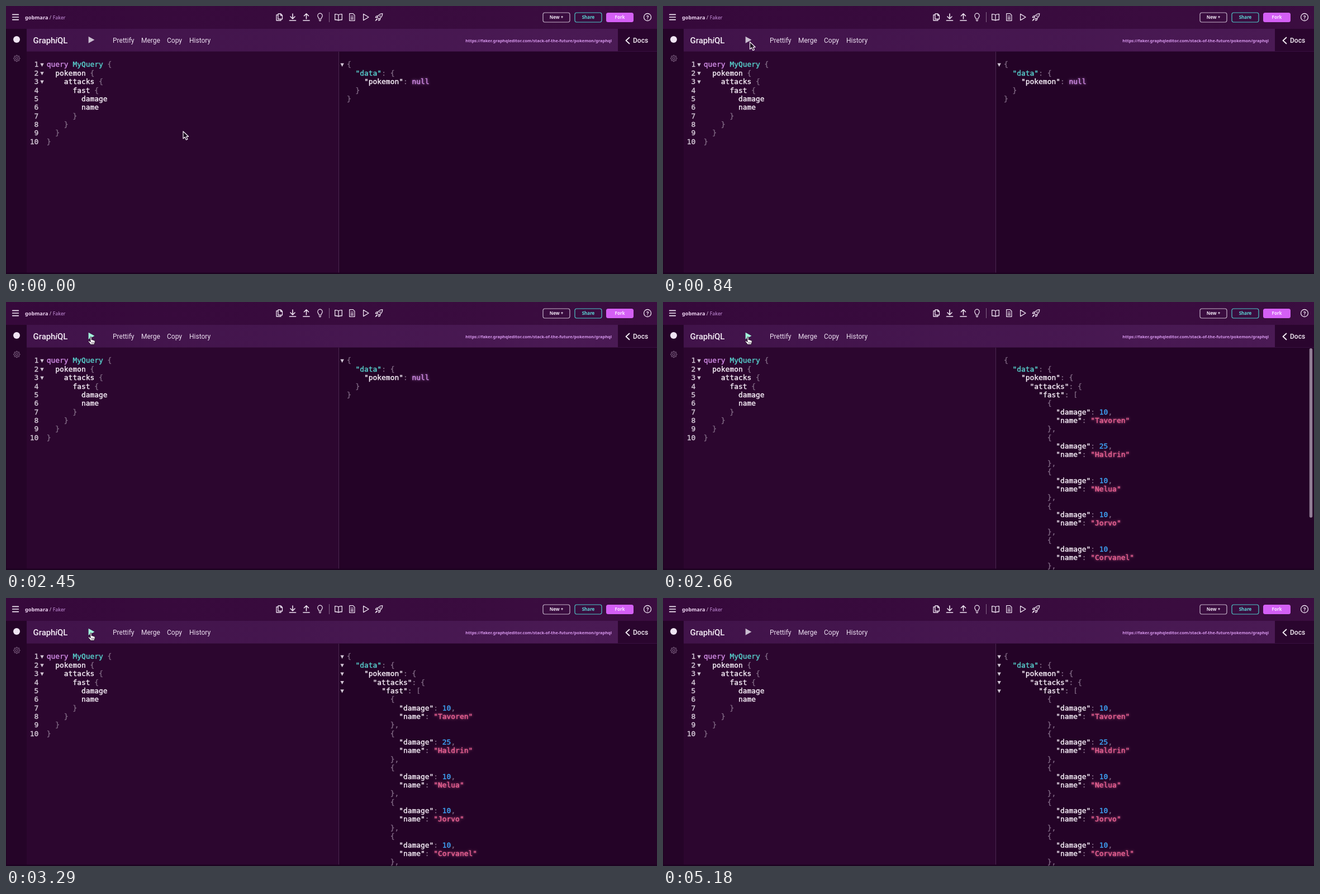
Recreate the animation shown at these times as an HTML page with a canvas. Size 1165 by 481 pixels, loop 5.25 s.

```html
<!DOCTYPE html>
<html lang="en">
<head>
<meta charset="utf-8">
<title>GraphiQL query</title>
<style>
html, body { margin: 0; width: 100%; height: 100%; overflow: hidden; background: #240327; }
canvas { display: block; width: 1165px; height: 481px; }
</style>
</head>
<body>
<canvas id="stage"></canvas>
<script>
const W = 1165, H = 481, LOOP = 5250, STEP = 70;
const ROW = 15.37, CELL = 7.766;
const MONO = '12.9px "DejaVu Sans Mono", monospace';
const UI = 'Roboto, sans-serif', SMALL = '"Noto Sans", sans-serif';
const COLOR = {
  white: '#f6eef7', teal: '#58d2ce', purple: '#cf8be4', punct: '#7d6580',
  number: '#3fa4f6', string: '#ea6394', gutter: '#d3c7d6', idle: '#cabed0', mint: '#a2f8dc'
};
const PLAY = [152, 63], REST = [317, 225];
const ARRIVE = 910, LOADED = 2520, FOLDED = 3120, LEAVE = 3430, GONE = 3780;

const canvas = document.getElementById('stage');
const ctx = canvas.getContext('2d');
const ratio = window.devicePixelRatio || 1;
canvas.width = W * ratio;
canvas.height = H * ratio;

const query = [
  'query MyQuery {', '  pokemon {', '    attacks {', '      fast {',
  '        damage', '        name', '      }', '    }', '  }', '}'
];
const attack = (name, damage = 10) => ({ damage, name });
const fast = [
  attack('Tavoren'), attack('Haldrin', 25), attack('Nelua'), attack('Jorvo'), attack('Corvanel')
];
const toLines = pokemon => JSON.stringify({ data: { pokemon } }, null, 2).split('\n');
const emptyLines = toLines(null);
// One more entry keeps the comma on the last visible bracket.
const fullLines = toLines({ attacks: { fast: [...fast, attack('Belwin')] } });

function rect(x, y, w, h, fill) {
  ctx.fillStyle = fill;
  ctx.fillRect(x, y, w, h);
}

function box(x, y, w, h, r, fill, stroke, lw = 1.2) {
  ctx.beginPath();
  ctx.roundRect(x, y, w, h, r);
  paint(fill, stroke, lw);
}

function paint(fill, stroke, lw = 1.3) {
  if (fill) { ctx.fillStyle = fill; ctx.fill(); }
  if (stroke) { ctx.strokeStyle = stroke; ctx.lineWidth = lw; ctx.stroke(); }
}

function path(d, x, y, fill, stroke, lw) {
  ctx.save();
  ctx.translate(x, y);
  const p = new Path2D(d);
  ctx.lineJoin = ctx.lineCap = 'round';
  if (fill) { ctx.fillStyle = fill; ctx.fill(p); }
  if (stroke) { ctx.strokeStyle = stroke; ctx.lineWidth = lw || 1.3; ctx.stroke(p); }
  ctx.restore();
}

function text(s, x, y, font, fill, align = 'left') {
  ctx.font = font;
  ctx.fillStyle = fill;
  ctx.textAlign = align;
  ctx.fillText(s, x, y);
}

// Code text is a little heavier than the regular weight.
function codeText(s, x, y, color, align, glow = 0) {
  ctx.shadowColor = color;
  ctx.shadowBlur = glow * ratio;
  text(s, x, y, MONO, color, align);
  ctx.shadowBlur = 0;
  ctx.strokeStyle = color;
  ctx.lineWidth = .4;
  ctx.strokeText(s, x, y);
}

function gradient(x0, x1, from, to) {
  const g = ctx.createLinearGradient(x0, 0, x1, 0);
  g.addColorStop(0, from);
  g.addColorStop(1, to);
  return g;
}

const rowY = i => 109.4 + i * ROW;
const foldMark = (x, row) => path('M-3.2 -2.6 H3.2 L0 3.6 Z', x, rowY(row) - 4, COLOR.gutter);

function queryColor(token) {
  if (token === 'query') return COLOR.purple;
  if (token === 'MyQuery') return COLOR.teal;
  return /\w/.test(token) ? COLOR.white : COLOR.punct;
}

function jsonColor(token, isKey) {
  if (token === '"data"') return COLOR.teal;
  if (isKey) return COLOR.white;
  if (token[0] === '"') return COLOR.string;
  if (token === 'null') return COLOR.purple;
  return /\d/.test(token) ? COLOR.number : COLOR.punct;
}

function code(lines, x, pick) {
  lines.forEach((line, row) => {
    if (rowY(row) > H + 12) return;
    for (const m of line.matchAll(/"[^"]*"|\w+|[^\s\w]/g)) {
      const color = pick(m[0], line[m.index + m[0].length] === ':');
      const glow = color === COLOR.string || m[0] === 'null' ? 4 : 0;
      codeText(m[0], x + m.index * CELL, rowY(row), color, 'left', glow);
    }
  });
}

function button(x, w, label, ink, fill, stroke) {
  box(x, 12, w, 17, 3.5, fill, stroke);
  text(label, x + w / 2, 23.2, '600 8px ' + SMALL, ink, 'center');
}

function topBar() {
  const ink = '#f0e5f3';
  const line = (d, x, lw) => path(d, x, 20, null, ink, lw);
  rect(0, 0, W, 41, gradient(0, W, '#36093b', '#3b0d40'));
  line('M-5.3 -4.6 H5.3 M-5.3 0 H5.3 M-5.3 4.6 H5.3', 17, 1.7);
  text('gobmara', 34, 23.6, '600 9.2px ' + SMALL, '#efd5f3');
  text('/', 77.7, 23.6, '9px ' + SMALL, '#d9c2de');
  text('Faker', 83.7, 23.6, '500 8.8px ' + SMALL, '#c993df');

  line('M-2 -6 H2.8 L5.5 -3.3 V3.5 H-2 Z M-2 -4 H-5 V6 H3 V3.5 M2.6 -6 V-3 H5.5', 489);
  line('M0 -6 V2.8 M-4 -1 L0 3 L4 -1 M-5.6 6 H5.6', 513, 1.6);
  line('M0 3 V-6 M-4 -2.2 L0 -6.2 L4 -2.2 M-5.6 6 H5.6', 537.5, 1.6);
  line('M-2 3 C-2 1 -4.2 0 -4.2 -2.6 A4.2 4.2 0 0 1 4.2 -2.6 C4.2 0 2 1 2 3 Z M-1.8 5 H1.8 M-1 6.7 H1', 562, 1.2);
  rect(578, 11, 1, 18, '#846788');
  line('M0 -4 C-2 -5.6 -4 -5.6 -6.3 -5.4 V4.8 C-4 4.6 -2 4.8 0 6 C2 4.8 4 4.6 6.3 4.8 V-5.4 C4 -5.6 2 -5.6 0 -4 V6', 595);
  line('M-4.6 -6.3 H1.8 L4.6 -3.5 V6.3 H-4.6 Z M-2.2 -2 H2.2 M-2.2 .8 H2.2 M-2.2 3.4 H2.2', 619.3, 1.2);
  line('M-4.4 -5.6 L5 0 L-4.4 5.6 Z', 644);
  line('M6.3 -6.3 C2 -6.3 -1 -4 -3.2 .4 L-.4 3.2 C4 1 6.3 -2 6.3 -6.3 Z M-1.5 -2.3 L-4.7 -2 L-6.3 .6 L-3.2 .4 M2.3 1.5 L2 4.7 L-.6 6.3 L-.4 3.2 M-4 3 L-6.3 6.3 L-3 4', 667.5, 1.2);
  ctx.beginPath();
  ctx.arc(669.3, 18.2, 1.1, 0, 7);
  paint(ink);

  button(961, 48, 'New +', '#efe4f2', null, '#c5b3ca');
  button(1018, 48, 'Share', '#5cd8d6', null, '#4fc7c7');
  button(1074, 49, 'Fork', '#fae4ff', '#d45ff5');
  ctx.beginPath();
  ctx.arc(1148, 20, 6.5, 0, 7);
  paint(null, ink, 1.3);
  text('?', 1148, 23.5, '700 9.5px ' + UI, ink, 'center');
}

function gear(x, y) {
  ctx.beginPath();
  for (let i = 0; i <= 64; i++) {
    const a = i / 64 * Math.PI * 2;
    const r = 4.9 + .75 * Math.tanh(3 * Math.cos(8 * a));
    ctx.lineTo(x + r * Math.cos(a), y + r * Math.sin(a));
  }
  paint(null, '#76597a', 1.1);
  ctx.beginPath();
  ctx.arc(x, y, 2, 0, 7);
  paint(null, '#76597a', 1.1);
}

function frame() {
  rect(0, 0, W, H, '#240327');
  rect(37, 81, 558, 400, '#2c062f');
  rect(0, 41, 37, 440, '#250428');
  topBar();
  rect(37, 41, 1058, 40, gradient(37, 1095, '#41134a', '#4a1a54'));
  rect(1095, 41, 70, 40, '#2a052e');
  rect(37, 81, W - 37, 1, '#391040');
  rect(595, 82, 1, 397, '#4a2750');
  rect(0, 41, 1, 440, '#1d0221');
  rect(0, 478.5, W, 2.5, '#1d0221');

  ctx.beginPath();
  ctx.arc(19, 60, 6, 0, 7);
  paint('#efe4f2');
  gear(19.3, 94);

  const title = '500 14.9px ' + UI;
  let x = 48.5;
  for (const [part, font] of [['Graph', title], ['i', 'italic ' + title], ['QL', title]]) {
    text(part, x, 66.5, font, '#f7eff8');
    x += ctx.measureText(part).width;
  }
  [['Prettify', 191], ['Merge', 242], ['Copy', 288], ['History', 328]].forEach(([label, left]) =>
    text(label, left, 66, '12px ' + UI, '#ecdff0'));
  text('https://faker.graphqleditor.com/stack-of-the-future/pokemon/graphql',
    1084, 65, '600 7.45px ' + SMALL, '#d898ee', 'right');
  path('M3 -5.5 L-3 0 L3 5.5', 1112.5, 62, null, '#f5eef6', 1.8);
  text('Docs', 1122, 66.2, '500 12px ' + UI, '#f5eef6');
}

function editor() {
  query.forEach((_, i) => codeText(i + 1, 58.3, rowY(i), COLOR.gutter, 'right'));
  [0, 1, 2].forEach(i => foldMark(64.5, i));
  code(query, 72.8, queryColor);
}

function response(t) {
  const loaded = t >= LOADED;
  code(loaded ? fullLines : emptyLines, 610, jsonColor);
  const folds = !loaded ? 1 : t >= FOLDED ? 5 : 0;
  for (let i = 0; i < folds; i++) foldMark(601.6, i);
  if (loaded) {
    ctx.globalAlpha = clamp((3220 - t) / 210);
    box(1156.8, 83, 5.4, 304, 2.7, '#927e96');
    ctx.globalAlpha = 1;
  }
}

const clamp = v => Math.max(0, Math.min(1, v));
const ease = v => v * v * (3 - 2 * v);
const mix = (a, b, k) => a.map((v, i) => v + (b[i] - v) * k);

function arrow([x, y]) {
  path('M0 0 V13 L3.1 10.2 L5.4 15.2 L7.9 14.1 L5.6 9.3 H9.6 Z', x, y, '#1a041d', '#f5f0f6', 1.2);
}

function hand([x, y]) {
  path('M-1.3 .8 C-1.3 -.7 1.2 -.7 1.2 .8 V5 C2 4.2 3.3 4.5 3.5 5.5 C4.3 4.9 5.4 5.3 5.6 6.2 ' +
    'C6.6 5.8 7.3 6.5 7.3 7.5 C7.3 10.2 6.4 11.5 5.8 13.3 H-.8 C-1.5 11.5 -3.2 10 -4.5 8.3 ' +
    'C-5.1 7.2 -3.8 6.2 -2.8 7.1 L-1.3 8.5 Z', x, y, '#fbf8fc', '#1a041d', 1);
  path('M1.2 9 V11.5 M3.1 9 V11.5 M5 9 V11.5', x, y, null, '#1a041d', .6);
}

function pointer(t) {
  if (t < ARRIVE) arrow(mix(REST, [155.5, 64.5], ease(clamp((t - 350) / 490))));
  else if (t < LEAVE) hand(PLAY);
  else if (t < GONE) arrow(mix(PLAY, [1180, 200], ease(clamp((t - LEAVE + STEP) / (GONE - LEAVE)))));
}

function draw(t) {
  ctx.setTransform(ratio, 0, 0, ratio, 0, 0);
  ctx.lineJoin = 'round';
  frame();
  const hover = t >= ARRIVE && t < LEAVE;
  path('M-5 -6 L5.8 0 L-5 6 Z', 152.6, 60.8, hover ? COLOR.mint : COLOR.idle);
  editor();
  response(t);
  pointer(t);
}

function tick() {
  draw(Math.floor(performance.now() % LOOP / STEP) * STEP);
  requestAnimationFrame(tick);
}
tick();
</script>
</body>
</html>
```
